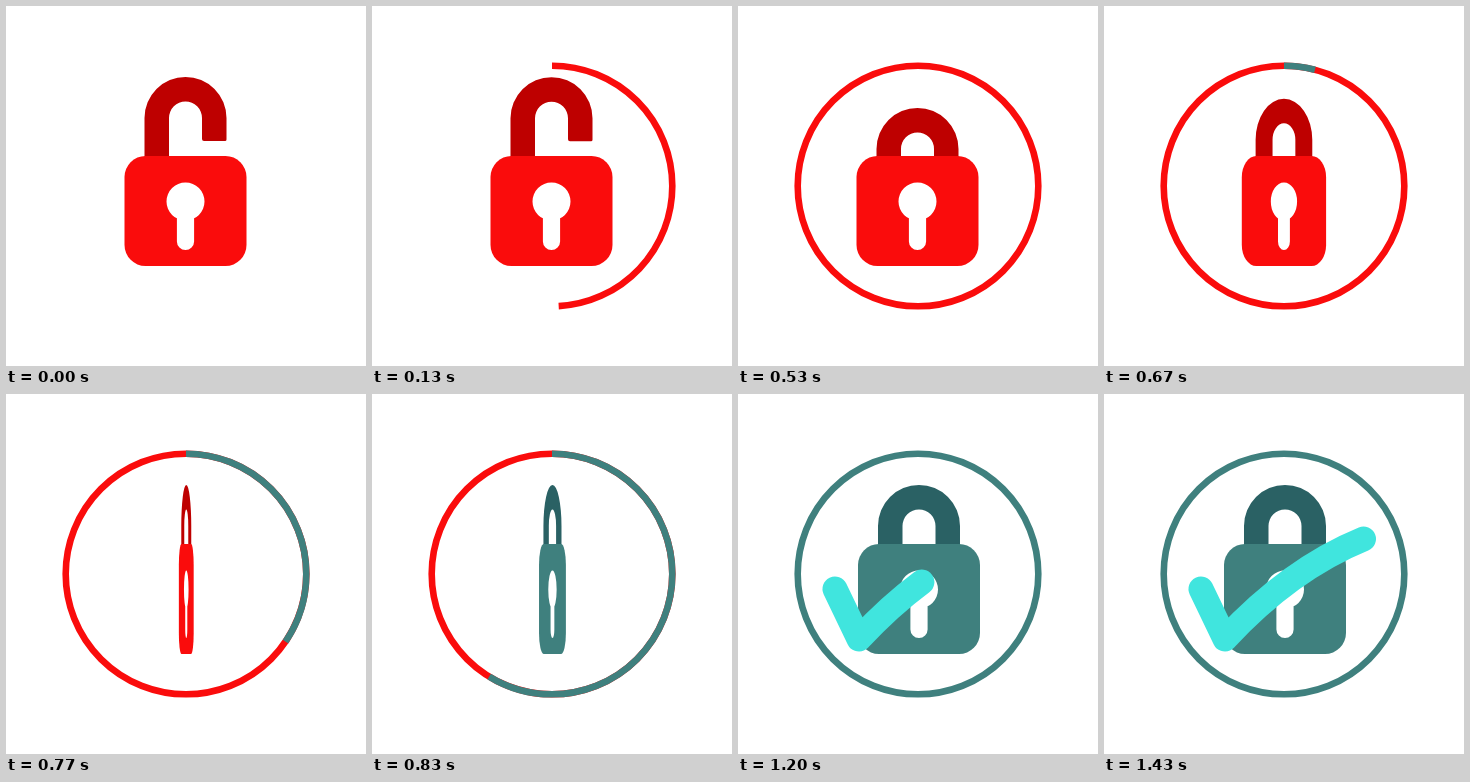
An HTML page with a canvas that plays this animation: 360x360 px, repeating every 1.83 s.

```html
<!DOCTYPE html>
<html lang="en">
<head>
<meta charset="utf-8">
<title>Padlock closing</title>
<style>
  html, body { margin: 0; width: 100%; height: 100%; overflow: hidden; background: #fff; }
  canvas { display: block; }
</style>
</head>
<body>
<canvas id="stage" width="360" height="360"></canvas>
<script>
const ctx = document.getElementById('stage').getContext('2d');
const LOOP = 1830;
const CHECK_LENGTH = 227.3;
const RED = { body: '#fa0c0c', shackle: '#be0000' };
const TEAL = { body: '#3f807e', shackle: '#2a6164' };
const CHECK = '#40e5de';

const progress = (t, start, end) => Math.min(1, Math.max(0, (t - start) / (end - start)));
const mix = (a, b, p) => a + (b - a) * p;
const easeInOut = p => p * p * (3 - 2 * p);
const easeOut = p => 1 - (1 - p) ** 2;

function drawRing(color, amount) {
  if (amount <= 0) return;
  ctx.beginPath();
  ctx.arc(180, 180, 120.3, -Math.PI / 2, -Math.PI / 2 + amount * 2 * Math.PI);
  ctx.lineCap = 'butt';
  ctx.lineWidth = 6.6;
  ctx.strokeStyle = color;
  ctx.stroke();
}

// x coordinates are relative to the lock's vertical axis
function drawShackle(color, top) {
  const centerY = top + 41;
  const end = top + 64;
  ctx.beginPath();
  ctx.moveTo(-41, 160);
  ctx.lineTo(-41, centerY);
  ctx.arc(0, centerY, 41, Math.PI, 0);
  ctx.arcTo(41, end, 16.5, end, 1.5);
  ctx.arcTo(16.5, end, 16.5, centerY, 2);
  ctx.lineTo(16.5, centerY);
  ctx.arc(0, centerY, 16.5, 0, Math.PI, true);
  ctx.lineTo(-16.5, 160);
  ctx.fillStyle = color;
  ctx.fill();
}

function drawBody(color) {
  ctx.beginPath();
  ctx.roundRect(-61, 150, 122, 110, 21);
  ctx.fillStyle = color;
  ctx.fill();

  ctx.beginPath();
  ctx.arc(0, 195.5, 19, 0, 2 * Math.PI);
  ctx.roundRect(-8.6, 195, 17.2, 49, 8.6);
  ctx.fillStyle = '#fff';
  ctx.fill();
}

function drawLock(t) {
  const angle = (progress(t, 545, 790) + progress(t, 790, 1080)) * Math.PI / 2;
  const colors = t < 790 ? RED : TEAL;
  const closedTop = mix(71, 102, easeInOut(progress(t, 110, 530)));
  const top = closedTop - 11 * easeOut(progress(t, 530, 770));

  ctx.save();
  ctx.translate(mix(179.5, 181, progress(t, 530, 1000)), 0);
  ctx.scale(Math.max(0.01, Math.abs(Math.cos(angle))), 1);
  drawShackle(colors.shackle, top);
  drawBody(colors.body);
  ctx.restore();
}

function drawCheck(amount) {
  if (amount <= 0) return;
  ctx.save();
  ctx.beginPath();
  ctx.moveTo(97, 195);
  ctx.lineTo(121, 245);
  ctx.quadraticCurveTo(186, 175, 259.5, 145);
  ctx.lineCap = ctx.lineJoin = 'round';
  ctx.lineWidth = 25;
  ctx.strokeStyle = CHECK;
  if (amount < 1) ctx.setLineDash([amount * CHECK_LENGTH, 1000]);
  ctx.stroke();
  ctx.restore();
}

function draw(t) {
  ctx.fillStyle = '#fff';
  ctx.fillRect(0, 0, 360, 360);
  const tealAmount = easeInOut(progress(t, 626, 993));
  if (tealAmount < 1) drawRing(RED.body, easeInOut(progress(t, 5, 260)));
  drawRing(TEAL.body, tealAmount);
  drawLock(t);
  drawCheck(easeInOut(progress(t, 900, 1420)));
}

const begin = performance.now();
function tick() {
  draw((performance.now() - begin) % LOOP);
  requestAnimationFrame(tick);
}
tick();
</script>
</body>
</html>
```
